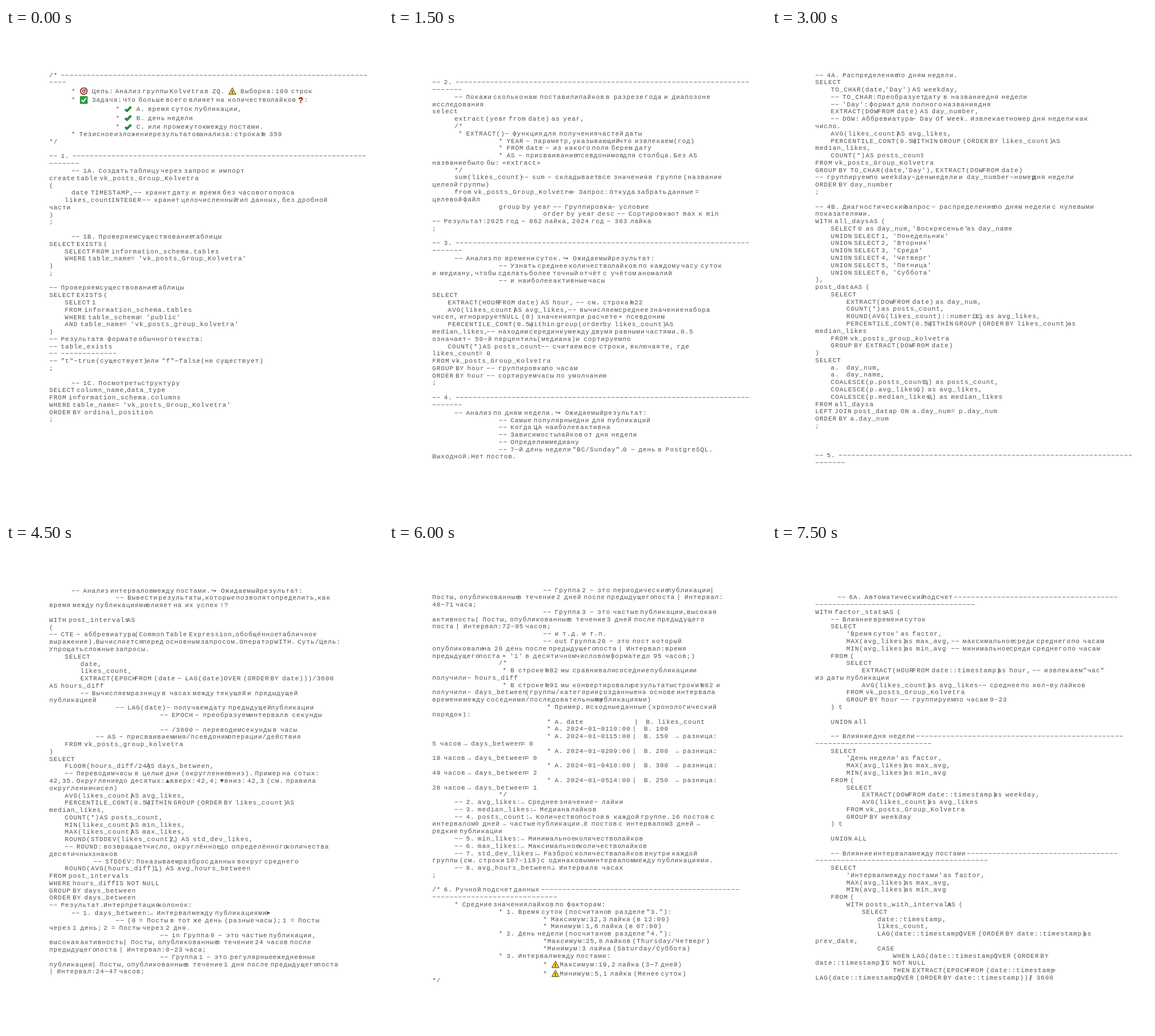
Write an HTML page with a canvas that moves like this. It is 658 px wide and 851 px high and loops after 8000 ms.

```html
<!DOCTYPE html>
<html lang="ru">
<head>
<meta charset="utf-8">
<title>SQL</title>
<style>
html, body { margin: 0; width: 100%; height: 100%; overflow: hidden; background: #fff; }
canvas { display: block; width: 658px; height: 851px; }
</style>
</head>
<body>
<canvas id="stage" width="658" height="851"></canvas>
<script>
// "~" is a tab, "{n}" is a run of n hyphens, "\u2009" is half a space.
const pages = [`/* {71}
{4}
~* 🎯 Цель: Анализ группы Kolvetra в ZQ. ⚠ Выборка: 100 строк
~* ✅ Задача: Что больше всего влияет на количество лайков ❓:
~~~* ✔ A. время суток публикации,
~~~* ✔ B. день недели
~~~* ✔ C. или промежуток между постами.
~* Тезисное изложение результатов анализа: строка № 359
*/

-- 1. {68}
{7}
~-- 1A. Создать таблицу через запрос и импорт
create table vk_posts_Group_Kolvetra
(
~date TIMESTAMP, -- хранит дату и время без часового пояса
    likes_count INTEGER -- хранит целочисленный тип данных, без дробной
части
)
;

~-- 1B. Проверяем существование таблицы
SELECT EXISTS (
    SELECT FROM information_schema.tables
    WHERE table_name = 'vk_posts_Group_Kolvetra'
)
;

-- Проверяем существование таблицы
SELECT EXISTS (
    SELECT 1
    FROM information_schema.tables
    WHERE table_schema = 'public'
    AND table_name = 'vk_posts_group_kolvetra'
)
-- Результат в формате обычного текста:
-- table_exists
-- {13}
-- "t"-true (существует) или "f"-false (не существует)
;

~-- 1C. Посмотреть структуру
SELECT column_name, data_type
FROM information_schema.columns
WHERE table_name = 'vk_posts_Group_Kolvetra'
ORDER BY ordinal_position
;`, `
-- 2. {68}
{7}
~-- Покажи сколько нам поставили лайков в разрезе года и диапозоне
исследования
select
~extract (year from date) as year,
~/*
~ * EXTRACT() - функция для получения частей даты
~~~* YEAR - параметр, указывающий что извлекаем (год)
~~~* FROM date - из какого поля берем дату
~~~* AS - присваивание псевдонимов для столбца. Без AS
название было бы: «extract»
~*/
~sum(likes_count) -- sum - складывает все значения в группе (название
целеой группы)
~from vk_posts_Group_Kolvetra -- Запрос: Откуда забрать данные =
целевой файл
~~~group by year -- Группировка - условие
~~~~~order by year desc -- Сортировка от max к min
-- Результат: 2025 год - 862 лайка, 2024 год - 363 лайка
;

-- 3. {68}
{7}
~-- Анализ по времени суток. ↪ Ожидаемый результат:
~~~-- Узнать среднее количество лайков по каждому часу суток
и медиану, чтобы сделать более точный отчёт с учётом аномалий
~~~-- и наиболее активные часы

SELECT
    EXTRACT(HOUR FROM date) AS hour, -- см. строка №22
    AVG(likes_count) AS avg_likes, -- вычисляем среднее значение набора
чисел, игнорирует NULL (0) значения при расчете + псевдоним
    PERCENTILE_CONT(0.5) within group(order by likes_count) AS
median_likes, -- находим серединку между двумя равными частями. 0.5
означает - 50-й перцентиль (медиана) и сортируем по
    COUNT(*) AS posts_count -- считаем все строки, включая те, где
likes_count = 0
FROM vk_posts_Group_Kolvetra
GROUP BY hour -- группировка по часам
ORDER BY hour -- сортируем часы по умолчанию
;

-- 4. {68}
{7}
~-- Анализ по дням недели. ↪ Ожидаемый результат:
~~~-- Самые популярные дни для публикаций
~~~-- Когда ЦА наиболее активна
~~~-- Зависимость лайков от дня недели
~~~-- Определим медиану
~~~-- 7-й день недели "ВС/Sunday". 0 - день в PostgreSQL.
Выходной. Нет постов.`, `-- 4A. Распределение по дням недели.
SELECT
    TO_CHAR(date, 'Day') AS weekday,
    -- TO_CHAR: Преобразует дату в название дня недели
    -- 'Day': формат для полного названия дня
    EXTRACT(DOW FROM date) AS day_number,
    -- DOW: Аббревиатура - Day Of Week. Извлекает номер дня недели как
число.
    AVG(likes_count) AS avg_likes,
    PERCENTILE_CONT(0.5) WITHIN GROUP (ORDER BY likes_count) AS
median_likes,
    COUNT(*) AS posts_count
FROM vk_posts_Group_Kolvetra
GROUP BY TO_CHAR(date, 'Day'), EXTRACT(DOW FROM date)
-- группируем по weekday-день недели и day_number-номер дня недели
ORDER BY day_number
;

-- 4B. Диагностический запрос - распределение по дням недели с нулевыми
показателями.
WITH all_days AS (
    SELECT 0 as day_num, 'Воскресенье' as day_name
    UNION SELECT 1, 'Понедельник'
    UNION SELECT 2, 'Вторник'
    UNION SELECT 3, 'Среда'
    UNION SELECT 4, 'Четверг'
    UNION SELECT 5, 'Пятница'
    UNION SELECT 6, 'Суббота'
),
post_data AS (
    SELECT
        EXTRACT(DOW FROM date) as day_num,
        COUNT(*) as posts_count,
        ROUND(AVG(likes_count)::numeric, 1) as avg_likes,
        PERCENTILE_CONT(0.5) WITHIN GROUP (ORDER BY likes_count) as
median_likes
    FROM vk_posts_group_kolvetra
    GROUP BY EXTRACT(DOW FROM date)
)
SELECT
    a.  day_num,
    a.  day_name,
    COALESCE(p.posts_count, 0) as posts_count,
    COALESCE(p.avg_likes, 0) as avg_likes,
    COALESCE(p.median_likes, 0) as median_likes
FROM all_days a
LEFT JOIN post_data p ON a.day_num = p.day_num
ORDER BY a.day_num
;



-- 5. {68}
{7}`, `~-- Анализ интервалов между постами. ↪ Ожидаемый результат:
~~~-- Вывести результаты, которые позволят определить, как
время между публикациями влияет на их успех !?

WITH post_intervals AS
(
-- CTE - аббревиатура (Common Table Expression, обобщённое табличное
выражение). Вычисляется перед основным запросом. Оператор WITH. Суть/Цель:
Упрощать сложные запросы.
    SELECT
        date,
        likes_count,
        EXTRACT(EPOCH FROM (date - LAG(date) OVER (ORDER BY date)))/3600
AS hours_diff
        -- Вычисляем разницу в часах между текущей и предыдущей
публикацией
~~~-- LAG(date) - получаем дату предыдущей публикации
~~~~~-- EPOCH - преобразуем интервал в секунды

~~~~~-- /3600 - переводим секунды в часы
            -- AS - присваиваем имя/псевдоним операции/действия
    FROM vk_posts_group_kolvetra
)
SELECT
    FLOOR(hours_diff/24) AS days_between,
    -- Переводим часы в целые дни (округление вниз). Пример на сотых:
42,35. Округление до десятых: ▲вверх: 42,4; ▼вниз: 42,3 (см. правила
округления чисел)
    AVG(likes_count) AS avg_likes,
    PERCENTILE_CONT(0.5) WITHIN GROUP (ORDER BY likes_count) AS
median_likes,
    COUNT(*) AS posts_count,
    MIN(likes_count) AS min_likes,
    MAX(likes_count) AS max_likes,
    ROUND(STDDEV(likes_count), 2) AS std_dev_likes,
    -- ROUND: возвращает число, округлённое до определённого количества
десятичных знаков
~~-- STDDEV: Показываем разброс данных вокруг среднего
    ROUND(AVG(hours_diff), 1) AS avg_hours_between
FROM post_intervals
WHERE hours_diff IS NOT NULL
GROUP BY days_between
ORDER BY days_between
-- Результат. Интерпретация колонок:
~-- 1. days_between: → Интервал между публикациями ➤
~~~-- (0 = Посты в тот же день (разные часы); 1 = Посты
через 1 день; 2 = Посты через 2 дня.
~~~~~-- in Группа 0 - это частые публикации,
высокая активность | Посты, опубликованные в течение 24 часов после
предыдущего поста | Интервал: 0-23 часа;
~~~~~-- Группа 1 - это регулярные ежедневные
публикации | Посты, опубликованные в течение 1 дня после предыдущего поста
| Интервал: 24-47 часов;`, `~~~~~-- Группа 2 - это периодические публикации |
Посты, опубликованные в течение 2 дней после предыдущего поста | Интервал:
48-71 часа;
~~~~~-- Группа 3 - это частые публикации, высокая
активность | Посты, опубликованные в течение 3 дней после предыдущего
поста | Интервал: 72-95 часов;
~~~~~-- и т.д. и т.п.
~~~~~-- out Группа 20 - это пост который
опубликовали на 20 день после предыдущего поста | Интервал: время
предыдущего поста + '1' в десятичном числовом формате до 95 часов;)
~~~/*
~~~ * В строке №82 мы сравнивали соседние публикации и
получили - hours_diff
~~~ * В строке №91 мы конвертировали результаты строки №82 и
получили - days_between (группы/категории, созданные на основе интервала
времени между соседними/последовательными публикациями)
~~~~~ * Пример. Исходные данные (хронологический
порядок):
~~~~~ * A. date             \u2009|  B. likes_count
~~~~~ * A. 2024-01-01 10:00 |  B. 100
~~~~~ * A. 2024-01-01 15:00 |  B. 150  → разница:
5 часов → days_between = 0
~~~~~ * A. 2024-01-02 09:00 |  B. 200  → разница:
18 часов → days_between = 0
~~~~~ * A. 2024-01-04 10:00 |  B. 300  → разница:
49 часов → days_between = 2
~~~~~ * A. 2024-01-05 14:00 |  B. 250  → разница:
28 часов → days_between = 1
~~~*/
~-- 2. avg_likes: → Среднее значение - лайки
~-- 3. median_likes: → Медиана лайков
~-- 4. posts_count: → Количество постов в каждой группе. 16 постов с
интервалом 0 дней → частые публикации. 8 постов с интервалом 3 дней →
редкие публикации
~-- 5. min_likes: → Минимальное количество лайков
~-- 6. max_likes: → Максимальное количество лайков
~-- 7. std_dev_likes: → Разброс количества лайков внутри каждой
группы (см. строки 107-118) с одинаковым интервалом между публикациями.
~-- 8. avg_hours_between: → Интервал в часах
;

/* 6. Ручной подсчет данных {46}
{29}
~* Средние значения лайков по факторам:
~~~* 1. Время суток (посчитано в разделе "3."):
~~~~~* Максимум: 32,3 лайка (в 12:00)
~~~~~* Минимум: 1,6 лайка (в 07:00)
~~~* 2. День недели (посчитано в разделе "4."):
~~~~~*Максимум: 25,8 лайков (Thursday/Четверг)
~~~~~*Минимум: 3 лайка (Saturday/Суббота)
~~~* 3. Интервал между постами:
~~~~~* ⚠Максимум: 19,2 лайка (3-7 дней)
~~~~~* ⚠Минимум: 5,1 лайка (Менее суток)
*/`, `
~-- 6A. Автоматический подсчет {38}
{37}
WITH factor_stats AS (
    -- Влияние времени суток
    SELECT
        'Время суток' as factor,
        MAX(avg_likes) as max_avg, -- максимальное среди среднего по часам
        MIN(avg_likes) as min_avg  -- минимальное среди среднего по часам
    FROM (
        SELECT
            EXTRACT(HOUR FROM date::timestamp) as hour, -- извлекаем "час"
из даты публикации
            AVG(likes_count) as avg_likes -- среднее по кол-ву лайков
        FROM vk_posts_Group_Kolvetra
        GROUP BY hour -- группируем по часам 0-23
    ) t

    UNION all

    -- Влияние дня недели {48}
{27}
    SELECT
        'День недели' as factor,
        MAX(avg_likes) as max_avg,
        MIN(avg_likes) as min_avg
    FROM (
        SELECT
            EXTRACT(DOW FROM date::timestamp) as weekday,
            AVG(likes_count) as avg_likes
        FROM vk_posts_Group_Kolvetra
        GROUP BY weekday
    ) t

    UNION ALL

    -- Влияние интервала между постами {35}
{40}
    SELECT
        'Интервал между постами' as factor,
        MAX(avg_likes) as max_avg,
        MIN(avg_likes) as min_avg
    FROM (
        WITH posts_with_intervals AS (
            SELECT
                date::timestamp,
                likes_count,
                LAG(date::timestamp) OVER (ORDER BY date::timestamp) as
prev_date,
                CASE
                    WHEN LAG(date::timestamp) OVER (ORDER BY
date::timestamp) IS NOT NULL
                    THEN EXTRACT(EPOCH FROM (date::timestamp -
LAG(date::timestamp) OVER (ORDER BY date::timestamp))) / 3600`];

const ctx = document.getElementById('stage').getContext('2d');
const LEFT = 75.5, TOP = 85.5, CELL = 6.773, PITCH = 7.55, TAB = 38.7;
const LINE = 12.78, TALL = 15.6, ICON = 15.5;
const HOLD = 1500, LOOP = 8000, INK = '#505050';
const GAPS = { ' ': CELL, '~': TAB, '\u2009': CELL / 2 };
const WIDTHS = { '❓': 11.5, '↪': 10.5 };

function disc(r, color) {
  ctx.fillStyle = color;
  ctx.beginPath();
  ctx.arc(0, 0, r, 0, 7);
  ctx.fill();
}

function path(points, color, width) {
  ctx.beginPath();
  points.forEach(([x, y]) => ctx.lineTo(x, y));
  ctx.lineWidth = width;
  ctx.strokeStyle = color;
  ctx.stroke();
}

function sign(char, size, color, y) {
  ctx.font = `bold ${size}px "Liberation Sans", sans-serif`;
  ctx.textAlign = 'center';
  ctx.fillStyle = color;
  ctx.fillText(char, 0, y);
}

// Icons are drawn around their centre.
const icons = {
  '🎯'() {
    disc(6.6, '#3a2a28');
    disc(6, '#d8402f');
    disc(4.5, '#fff');
    disc(3.1, '#d8402f');
    disc(1.3, '#fff');
    path([[0, 0], [4.5, -4.5]], '#2b6f9c', 1.6);
    path([[3.5, -5.5], [4.2, -4.2], [6, -3.6]], '#3fa4d0', 1.8);
  },
  '✅'() {
    ctx.fillStyle = '#20a83a';
    ctx.fillRect(-6.3, -6.3, 12.6, 12.6);
    ctx.strokeStyle = '#176b27';
    ctx.lineWidth = 0.8;
    ctx.strokeRect(-6.1, -6.1, 12.2, 12.2);
    path([[-3.8, 0], [-1.2, 2.9], [3.9, -3.2]], '#fff', 1.9);
  },
  '✔'() {
    const tick = [[-5, 0.6], [-2, 3.4], [5, -3.8]];
    path(tick, '#1c4a1c', 3.6);
    path(tick, '#23a23a', 2.2);
  },
  '⚠'() {
    ctx.beginPath();
    ctx.moveTo(0, -5.8);
    ctx.lineTo(6.3, 5.6);
    ctx.lineTo(-6.3, 5.6);
    ctx.closePath();
    ctx.fillStyle = '#fbd92c';
    ctx.fill();
    ctx.lineWidth = 1;
    ctx.strokeStyle = '#4a4018';
    ctx.stroke();
    sign('!', 9, '#222', 4.4);
  },
  '❓'() {
    ctx.translate(-2.5, 0);
    sign('?', 15, '#4a1512', 5.4);
    sign('?', 13.5, '#cf2f27', 4.9);
  }
};

function drawIcon(icon, x, y) {
  ctx.save();
  ctx.translate(x + 8, y - 3.6);
  ctx.lineJoin = 'round';
  icons[icon]();
  ctx.restore();
}

// Words start on the cell grid, their letters run at the wider pitch.
function drawLine(line, y) {
  let x = LEFT;
  for (const word of line.match(/[ ~\u2009]|[🎯✅✔⚠❓]|[^ ~\u2009🎯✅✔⚠❓]+/gu) || []) {
    if (GAPS[word]) {
      x += GAPS[word];
    } else if (icons[word]) {
      drawIcon(word, x, y);
      x += WIDTHS[word] || ICON;
    } else {
      [...word].forEach((char, i) => ctx.fillText(char, x + i * PITCH, y));
      x += WIDTHS[word] || word.length * CELL;
    }
  }
}

function drawPage(text) {
  ctx.fillStyle = '#fff';
  ctx.fillRect(0, 0, 658, 851);
  ctx.fillStyle = INK;
  ctx.font = '11px "Liberation Mono", monospace';
  let y = TOP - LINE;
  for (const line of text.split('\n')) {
    y += /[🎯✅✔⚠❓]/u.test(line) ? TALL : LINE;
    if (/[↪➤]/.test(line)) y += 1.2;
    // The minus sign gives the long, high stroke of a typewriter hyphen.
    drawLine(line.replace(/\{(\d+)\}/g, (_, n) => '-'.repeat(n)).replace(/-/g, '−'), y);
  }
}

let shown = -1;
const start = performance.now();

function tick() {
  const page = Math.floor((performance.now() - start) % LOOP / HOLD);
  if (page !== shown) drawPage(pages[shown = page]);
  requestAnimationFrame(tick);
}
tick();
</script>
</body>
</html>
```
